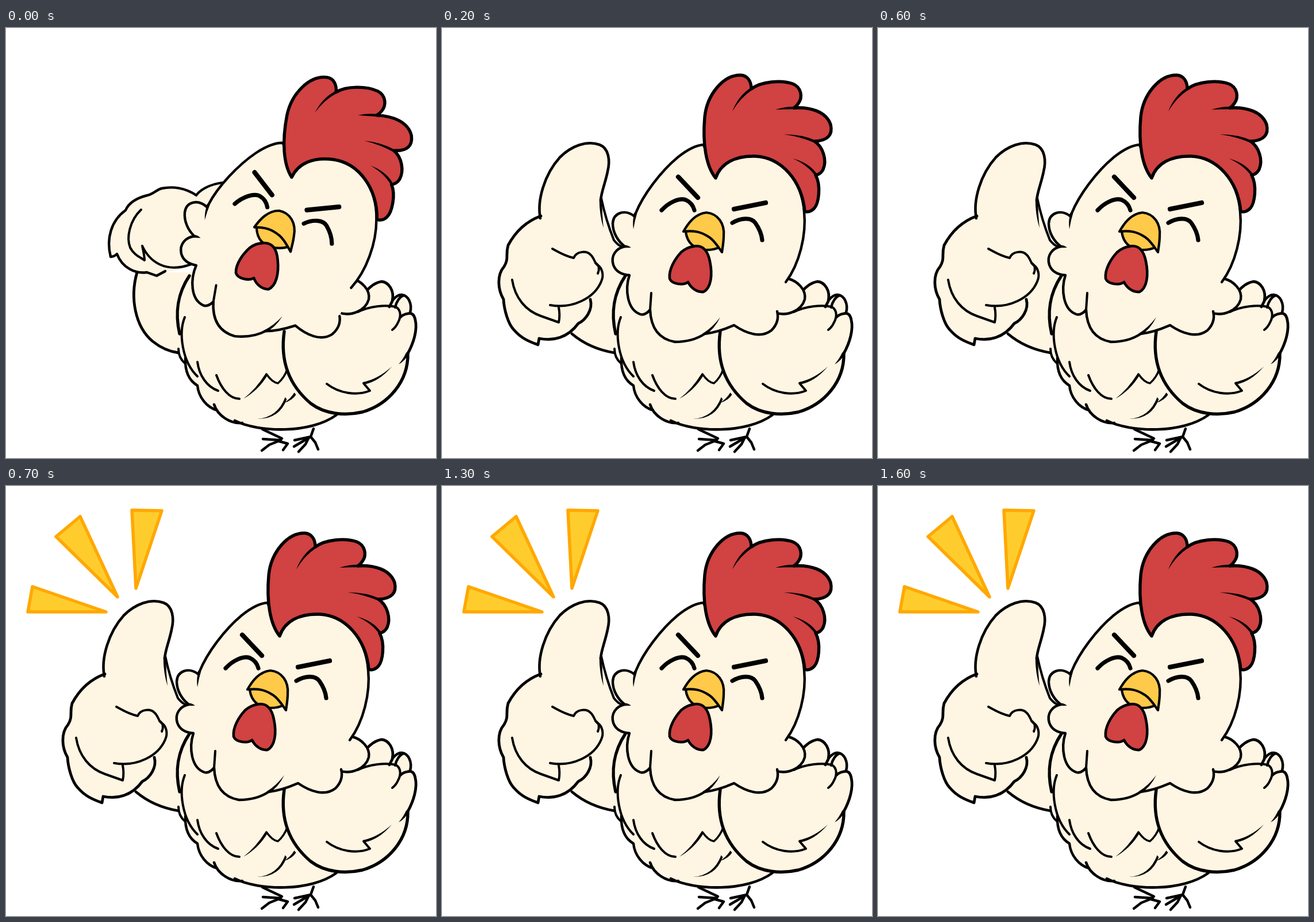
An HTML page with a canvas that plays this animation: 748x748 px, repeating every 2.2 s.

```html
<!DOCTYPE html>
<html>
<head>
<meta charset="utf-8">
<style>
html, body { margin: 0; width: 100%; height: 100%; overflow: hidden; background: #fff; }
canvas { display: block; }
</style>
</head>
<body>
<canvas id="stage" width="748" height="748"></canvas>
<script>
const ctx = document.getElementById('stage').getContext('2d');
const LOOP = 2200;
const CREAM = '#fff5e3', RED = '#d14242', BEAK = '#ffc94a', INK = '#000';

function shape(d, fill, width = 0, ink = INK) {
  const path = new Path2D(d);
  if (fill) {
    ctx.fillStyle = fill;
    ctx.fill(path);
  }
  if (width) {
    ctx.strokeStyle = ink;
    ctx.lineWidth = width;
    ctx.stroke(path);
  }
}

const line = (d, width = 4) => shape(d, null, width);

// A curved stroke that thins out towards its end.
function crease(x0, y0, cx, cy, x1, y1, width = 4.6) {
  const length = Math.hypot(x1 - x0, y1 - y0);
  const nx = (y0 - y1) / length * width / 2, ny = (x1 - x0) / length * width / 2;
  ctx.fillStyle = INK;
  ctx.beginPath();
  ctx.moveTo(x0 + nx, y0 + ny);
  ctx.quadraticCurveTo(cx + nx, cy + ny, x1, y1);
  ctx.quadraticCurveTo(cx - nx, cy - ny, x0 - nx, y0 - ny);
  ctx.fill();
}

function posed(transform, draw) {
  ctx.save();
  transform();
  draw();
  ctx.restore();
}

function feet() {
  line('M446 698L480 714M447 715L478 717L458 725L445 735M468 717L490 723L482 734', 4.5);
  line('M535 697L530 711M502 717L516 714L530 711L501 728M526 714L521 724L509 737M530 711L538 721L543 733', 4.5);
}

function windupArm() {
  shape('M227 425C215 470 225 520 255 545C270 557 285 563 300 565L330 425Z', CREAM);
  line('M228 425C215 470 225 520 255 545C270 557 285 563 300 565', 4.8);
  shape('M328 291C340 279 355 272 376 269L370 310L330 320Z', CREAM);
  line('M328 295C336 281 355 272 376 269');
  shape('M331 291C312 278 290 275 271 279C262 281 255 290 246 291C230 295 214 303 208 317C183 335 174 366 182 398C187 398 190 396 193 393C202 417 225 428 245 425L262 431L277 423C292 424 309 420 322 411L350 350Z', CREAM);
  line('M331 291C312 278 290 275 271 279C262 281 255 290 246 291C230 295 214 303 208 317C183 335 174 366 182 398C187 398 190 396 193 393C202 417 225 428 245 425L262 431L277 423', 4.4);
  line('M235 316C215 335 209 365 216 382C222 394 232 398 241 404C241 397 239 388 237 379C250 407 278 427 322 411');
}

function thumbArm() {
  shape('M270 290L296 360L335 430L302 566C270 560 245 550 226 532Z', CREAM);
  line('M226 532C245 548 270 560 300 565', 4.8);
  line('M277 296C282 320 289 344 299 369C303 374 307 378 312 380');
  shape('M172 328C165 300 178 255 205 225C225 205 252 195 274 203C290 209 293 230 288 250C284 270 277 285 276 300L285 420C282 445 270 459 258 470C263 490 250 508 237 514C219 539 193 545 168 540L167 551C150 545 137 539 125 525C115 515 108 490 107 472C95 455 97 430 108 415C117 400 110 395 115 378C130 350 150 335 172 328Z', CREAM);
  line('M171 331C165 300 178 255 205 225C225 205 252 195 274 203C290 209 293 230 288 250C284 270 277 285 276 300', 4.6);
  crease(276, 298, 276, 325, 281, 348);
  line('M172 327C150 335 130 350 115 378C110 395 117 400 108 415C95 430 97 455 107 472C108 490 115 515 125 525C137 539 150 545 167 551L169 540C193 545 219 539 237 514C250 508 263 490 258 472', 4.8);
  line('M192 384C203 390 214 397 229 400C234 388 251 387 258 394C265 400 265 408 270 412C279 417 282 430 277 441C265 470 227 489 188 482');
  line('M267 409C274 412 274 421 271 427');
  line('M122 438C127 470 146 492 172 501L203 512C205 503 205 496 203 486');
}

function torso() {
  shape('M325 425C296 470 294 510 303 550C307 580 313 600 333 621C338 645 360 662 400 687C440 704 530 706 575 673L620 600L640 450Z', CREAM);
  line('M319 431C297 464 294 497 302 532', 5.4);
  line('M300 558C300 569 304 577 311 583M311 503C300 530 306 580 333 606');
  line('M312 574C311 597 318 613 333 622C335 643 350 660 367 665', 4.4);
  line('M362 655C368 674 390 689 411 687M398 683C440 704 530 706 575 673', 4.6);
  line('M333 581C336 604 349 624 369 631M366 604C374 626 388 645 406 645');
  line('M453 602C460 612 466 617 473 618C480 612 486 603 489 594', 3.5);
  crease(453, 603, 437, 629, 413, 645);
  crease(487, 644, 474, 679, 437, 680);
  crease(503, 636, 497, 646, 484, 652);
}

function wing() {
  shape('M484 528C478 570 485 615 530 653C555 672 590 675 620 668C665 655 700 615 699 566C709 548 716 525 712 508C710 498 707 495 703 495C706 480 700 465 688 464C681 465 677 470 673 473C674 455 665 440 653 441C641 443 632 452 626 460L580 500Z', CREAM);
  line('M484 528C478 570 485 615 530 653C555 672 590 675 620 668C665 655 700 615 699 566', 5.4);
  line('M699 566C709 548 716 525 712 508C710 498 706 495 698 497C693 498 689 500 686 503', 4.8);
  crease(698, 566, 693, 577, 683, 585);
  line('M625 460C632 451 641 443 653 441C666 442 676 457 672 475L667 485', 4.8);
  line('M673 473C678 467 682 464 688 464C700 465 707 480 703 495M677 486C679 476 685 467 692 465', 4.5);
  line('M612 494C632 484 660 481 678 485C688 491 687 503 682 512C679 519 676 522 672 525');
  line('M558 619C580 636 610 640 633 631L622 618');
  crease(622, 618, 648, 613, 671, 589);
}

function neckTuft() {
  shape('M579 495C602 503 626 490 631 472C634 455 618 440 602 436', CREAM, 4.4);
}

function comb() {
  shape('M476 261C459 240 453 200 457 155C461 115 490 81 520 82C532 83 538 93 538 106C555 93 590 90 610 97C625 103 628 120 620 131C617 136 615 137 612 139C640 137 668 145 676 168C680 185 672 196 648 197C663 207 670 230 663 246C660 252 655 255 650 256C660 275 655 305 648 313C643 319 636 321 631 319C626 265 590 225 545 223C510 222 485 235 476 261Z', RED, 5.4);
  crease(538, 106, 517, 120, 505, 145);
  crease(614, 139, 596, 139, 580, 142);
  crease(650, 198, 625, 187, 595, 185);
  crease(651, 256, 637, 236, 610, 227);
}

function face() {
  line('M411 259L445 295M508 315L563 304', 8.2);
  line('M382 317C395 303 413 295 424 299C433 303 437 309 439 317M505 339C520 330 538 329 545 339C552 349 556 358 557 369', 7.2);
  shape('M424 355C427 375 440 385 460 386C470 386 478 384 483 381L478 350L440 345Z', BEAK, 4.2);
  shape('M420 354C428 340 440 323 460 321C480 323 492 340 490 362C490 372 488 382 487 390C480 380 474 370 465 364C450 354 438 352 420 354Z', BEAK, 4.2);
  shape('M437 380C455 376 463 390 466 406C471 430 468 452 455 459C443 460 433 452 428 442C420 448 400 446 396 436C394 420 405 402 416 390C424 383 430 381 437 380Z', RED, 4.6);
}

function head() {
  // Left open at the neck, where the tuft joins.
  shape('M598 442C622 410 634 360 630 320C626 265 590 225 545 223C510 222 480 235 476 258L455 203C440 204 425 213 410 225C380 250 350 290 337 322L334 327C318 315 298 321 297 340C297 356 306 371 318 380C303 383 293 396 298 412C302 423 312 429 326 430C318 455 322 490 345 498C352 500 357 496 362 490C363 515 372 540 405 546C430 546 445 540 457 532C475 530 492 524 508 517C530 532 555 540 573 526C583 516 586 505 583 493', CREAM, 4.4);
  line('M364 461L362 490');
  crease(337, 322, 333, 335, 333, 350);
  crease(318, 380, 323, 380, 329, 382);
  crease(455, 533, 472, 523, 484, 503);
  comb();
  face();
}

function rays() {
  ['M87 88L129 53L194 193Z', 'M219 42L271 43L226 178Z', 'M46 175L38 219L174 219Z']
    .forEach(d => shape(d, '#ffcc2e', 5.5, '#ffa800'));
}

// Overshoot of the gesture, settling on every second beat.
function swingAt(beat) {
  return beat < 6 && beat % 2 ? 0.5 ** ((beat - 1) / 2) : 0;
}

function raysOn(beat) {
  return beat >= 7 && ![9, 12, 15].includes(beat);
}

function render(time) {
  const beat = Math.floor((time % LOOP) / 100);
  const windup = beat === 0;
  const swing = swingAt(beat);

  ctx.fillStyle = '#fff';
  ctx.fillRect(0, 0, 748, 748);
  ctx.lineCap = ctx.lineJoin = 'round';

  feet();
  posed(() => {
    ctx.translate(300, 560);
    ctx.scale(1 + 0.18 * swing, 1 + 0.07 * swing);
    ctx.translate(-300, -560);
  }, windup ? windupArm : thumbArm);
  torso();
  wing();
  neckTuft();
  posed(() => {
    ctx.translate(500 - 3 * swing, 470 - 14 * swing);
    ctx.rotate(windup ? 0.1 : -0.03 * swing);
    ctx.translate(-500, -470);
  }, head);
  if (raysOn(beat)) rays();
}

const start = performance.now();
function tick() {
  render(performance.now() - start);
  requestAnimationFrame(tick);
}
tick();
</script>
</body>
</html>
```
